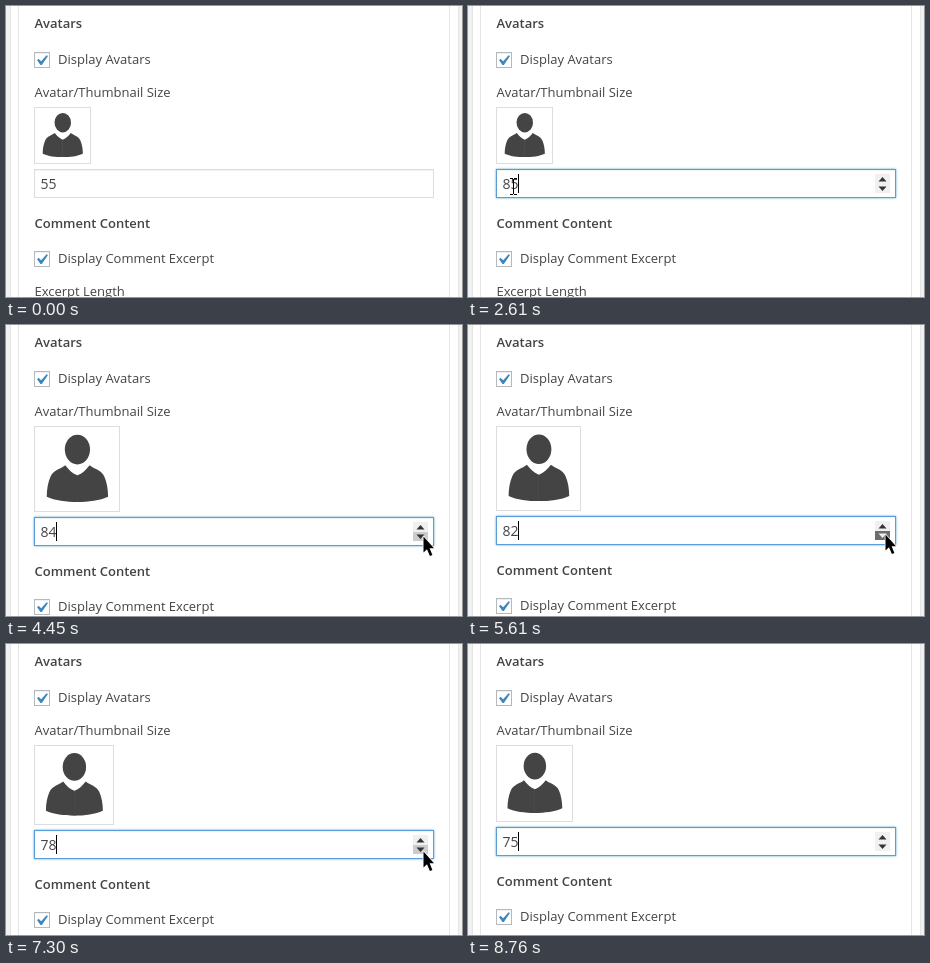
These frames come from a looping animation (456 px wide and 291 px high, 9.08 s). An HTML page with a canvas:

```html
<!DOCTYPE html>
<html lang="en">
<head>
<meta charset="utf-8">
<title>Avatar size setting</title>
<style>
  html, body { margin: 0; width: 100%; height: 100%; overflow: hidden; background: #fff; }
  canvas { display: block; }
</style>
</head>
<body>
<canvas id="stage" width="456" height="291"></canvas>
<script>
const ctx = document.getElementById('stage').getContext('2d');
const LOOP = 9080;
const TICK = 1000 / 13;

const ENTER = 240, HOVER = 990, FOCUS = 1140, SELECT = 1300;
const TYPE_FIRST = 2460, TYPE_SECOND = 2610, RESIZE = 2840;
const TRAVEL = 3230, ARRIVE = 4150, LEAVE = 8540, GONE = 8760;

// Ten presses: the first gaps are slow, the rest quicker.
const FIRST_PRESS = 4380, PRESSES = 10, SLOW_GAPS = 2, SLOW = 615, FAST = 385, LAG = 70;

const tickPath = new Path2D('M14.83 4.89l1.34.94-5.81 8.38H9.02L5.78 9.67l1.34-1.25 2.57 2.4z');
const arrowPath = new Path2D('M.5 .5V16.5L4 13.2 6.9 20 9.4 19 6.6 12.3H11Z');
const shoulderPath = new Path2D(
  'M0 .575C-.06 .555 -.1 .51 -.145 .455C-.2 .5 -.285 .51 -.32 .59' +
  'C-.35 .66 -.365 .74 -.365 .83C-.27 .875 -.13 .893 0 .893Z');

const lerp = (a, b, u) => a + (b - a) * u;
const progress = (t, from, to) => Math.min(1, Math.max(0, (t - from) / (to - from)));

function rect(x, y, w, h, color) {
  ctx.fillStyle = color;
  ctx.fillRect(x, y, w, h);
}

function frame(x, y, w, h, color) {
  ctx.strokeStyle = color;
  ctx.lineWidth = 1;
  ctx.strokeRect(x + .5, y + .5, w - 1, h - 1);
}

function text(str, x, y, weight = 400, size = 13, color = '#444') {
  ctx.font = `${weight} ${size}px "Open Sans", sans-serif`;
  ctx.fillStyle = color;
  ctx.fillText(str, x, y);
}

function pointerPosition(t) {
  if (t < TRAVEL) {
    const u = progress(t, ENTER, HOVER);
    return [lerp(22, 45, u), lerp(247, 180, u)];
  }
  if (t < ARRIVE) {
    const u = progress(t, TRAVEL, ARRIVE);
    const eased = 1 - (1 - u) ** 2.75;
    return [lerp(45, 417, eased), lerp(180, 211, eased) + 22 * Math.sin(Math.PI * u) ** 2];
  }
  const drift = lerp(211, 205, progress(t, ARRIVE, LEAVE));
  return [417, drift + 95 * progress(t, LEAVE, GONE)];
}

function pointerAt(t) {
  if (t < ENTER || t >= GONE) return null;
  const sampled = Math.floor((t + 12) / TICK) * TICK;
  const [x, y] = pointerPosition(sampled).map(Math.round);
  return { x, y };
}

const pressTime = i => FIRST_PRESS + SLOW * Math.min(i, SLOW_GAPS) + FAST * Math.max(0, i - SLOW_GAPS);

function fieldState(t) {
  let clicks = 0;
  while (clicks < PRESSES && t >= pressTime(clicks)) clicks++;
  const pressed = clicks > 0 && t < pressTime(clicks - 1) + LAG;
  const value = t < TYPE_FIRST ? 55 : t < TYPE_SECOND ? 8 : 85 - clicks;
  const size = t < RESIZE ? 55 : 85 - clicks + (pressed ? 1 : 0);
  return { value, size, pressed };
}

function drawPanel() {
  rect(0, 0, 456, 291, '#f1f1f1');
  rect(4, 0, 449, 291, '#fff');
  for (const x of [4, 12, 443, 452]) rect(x, 0, 1, 291, '#e5e5e5');
}

function drawCheckbox(y, label) {
  rect(28, y, 16, 16, '#fff');
  frame(28, y, 16, 16, '#b4b9be');
  rect(29, y + 1, 14, 1, '#f0f0f0');
  ctx.save();
  ctx.translate(25, y - 2);
  ctx.scale(1.05, 1.05);
  ctx.fillStyle = '#3f87bb';
  ctx.fill(tickPath);
  ctx.restore();
  text(label, 52, y + 12);
}

function drawAvatar(size) {
  frame(28, 101, size + 2, size + 2, '#ddd');
  ctx.save();
  ctx.translate(29 + size * .505, 102);
  ctx.fillStyle = '#444';
  for (const side of [1, -1]) {
    ctx.save();
    ctx.scale(size * side, size);
    ctx.fill(shoulderPath);
    ctx.restore();
  }
  ctx.fillRect(-.5, size * .58, 1, size * .31);
  ctx.beginPath();
  ctx.ellipse(0, size * .268, size * .15, size * .177, 0, 0, Math.PI * 2);
  ctx.fill();
  ctx.restore();
}

function triangle(y, dir, color) {
  ctx.fillStyle = color;
  ctx.beginPath();
  ctx.moveTo(410.5, y);
  ctx.lineTo(418.5, y);
  ctx.lineTo(414.5, y + 4.5 * dir);
  ctx.fill();
}

function drawSpinner(top, hover, pressed) {
  rect(407, top + 5, 15, 19, '#f0f0f0');
  if (hover) rect(407, top + 15, 15, 9, pressed ? '#6d6d6d' : '#ccc');
  triangle(top + 12.5, -1, '#333');
  triangle(top + 17.5, 1, pressed ? '#f0f0f0' : '#333');
}

function drawField(top, value, t, over, hover, pressed) {
  const focused = t >= FOCUS;
  ctx.save();
  if (focused) {
    ctx.shadowColor = 'rgba(30,140,190,.8)';
    ctx.shadowBlur = 2;
  }
  rect(28, top, 400, 29, focused ? '#5b9dd9' : '#ddd');
  ctx.restore();
  rect(29, top + 1, 398, 27, '#fff');
  rect(29, top + 1, 398, 1, '#f3f3f3');
  if (focused || over) drawSpinner(top, hover, pressed);

  const selected = t >= SELECT && t < TYPE_FIRST;
  if (selected) rect(34, top + 5, 16, 19, '#3399ff');
  text(String(value), 34.5, top + 20, 400, 14, selected ? '#fff' : '#444');
  const blinkOff = t >= 3920 && t < FIRST_PRESS;
  if (focused && !selected && !blinkOff) {
    const caret = t < SELECT || value < 10 ? 42 : 50;
    rect(caret, top + 5, 1, 19, '#000');
  }
}

function drawArrow({ x, y }) {
  ctx.save();
  ctx.translate(x, y);
  ctx.lineJoin = 'round';
  ctx.lineWidth = 1.5;
  ctx.strokeStyle = '#fff';
  ctx.stroke(arrowPath);
  ctx.fillStyle = '#000';
  ctx.fill(arrowPath);
  ctx.restore();
}

function drawBeam({ x, y }) {
  rect(x, y - 7, 1, 15, '#000');
  for (const end of [y - 8, y + 8]) {
    rect(x - 3, end, 3, 1, '#000');
    rect(x + 1, end, 3, 1, '#000');
  }
}

function draw(t) {
  const { value, size, pressed } = fieldState(t);
  const top = size + 108;
  const pointer = pointerAt(t);
  const over = pointer && pointer.x >= 28 && pointer.x < 428 && pointer.y >= top && pointer.y < top + 29;
  const onSpinner = over && pointer.x >= 407;

  drawPanel();
  text('Avatars', 28.5, 22, 600);
  drawCheckbox(46, 'Display Avatars');
  text('Avatar/Thumbnail Size', 28.5, 91);
  drawAvatar(size);
  drawField(top, value, t, over, onSpinner, pressed);
  text('Comment Content', 28.5, top + 59, 600);
  drawCheckbox(top + 82, 'Display Comment Excerpt');
  text('Excerpt Length', 28.5, top + 127);
  if (pointer) (over && !onSpinner ? drawBeam : drawArrow)(pointer);
}

let start;
function tick(now) {
  start ??= now;
  draw((now - start) % LOOP);
  requestAnimationFrame(tick);
}
draw(0);
requestAnimationFrame(tick);
</script>
</body>
</html>
```
